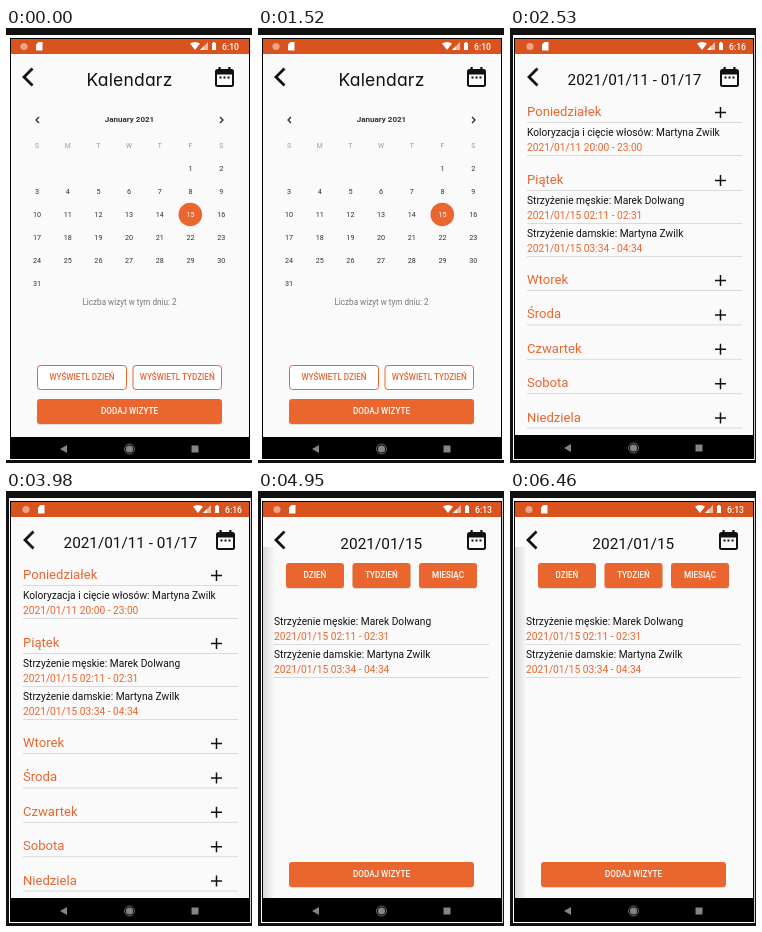
An HTML page for the animation above (7.46 s loop, 246x435 px).

```html
<!DOCTYPE html>
<html lang="pl">
<meta charset="utf-8">
<title>Kalendarz</title>
<style>
  html, body { margin: 0; width: 100%; height: 100%; overflow: hidden; background: #111 }
  svg { display: block; width: 246px; height: 435px; font-family: Roboto, sans-serif }
  .title { font-family: Inter, sans-serif; font-feature-settings: "cv11"; letter-spacing: .2px }
</style>
<svg id="stage" viewBox="0 0 246 435"></svg>
<script>
const ORANGE = '#e9662f', INK = '#111', RULE = '#dadada';
const stage = document.getElementById('stage');

const rect = (x, y, w, h, fill, extra = '') =>
  `<rect x="${x}" y="${y}" width="${w}" height="${h}" fill="${fill}" ${extra}/>`;
const path = (d, stroke, width, fill = 'none') =>
  `<path d="${d}" stroke="${stroke}" stroke-width="${width}" fill="${fill}"/>`;
const text = (x, y, size, str, fill = INK, extra = '') =>
  `<text x="${x}" y="${y}" font-size="${size}" fill="${fill}" ${extra}>${str}</text>`;
const centered = (x, y, size, str, fill, weight = 400, extra = '') =>
  text(x, y, size, str, fill, `text-anchor="middle" font-weight="${weight}" ${extra}`);
const at = (x, y, body) => `<g transform="translate(${x} ${y})">${body}</g>`;

function button(x, y, w, h, label, outlined) {
  const box = outlined
    ? rect(x + .5, y + .5, w - 1, h - 1, '#fff', `rx="3" stroke="${ORANGE}"`)
    : rect(x, y + 1, w, h, '#000', 'rx="3" opacity=".12"') + rect(x, y, w, h, ORANGE, 'rx="3"');
  return box + centered(x + w / 2, y + h / 2 + 2.9, 8.15, label, outlined ? ORANGE : '#fff', 500);
}

const calendarIcon =
  rect(1, 3, 17, 16, 'none', `rx="1.5" stroke="${INK}" stroke-width="2"`) +
  rect(1, 3, 17, 4.5, INK) + rect(3.5, 0, 2.2, 4, INK) + rect(13.3, 0, 2.2, 4, INK) +
  [4.5, 8.5, 12.5].map(x => rect(x, 9.5, 2, 2, INK)).join('');

function statusBar(left, right, time) {
  return rect(5, 11, 238, 15, '#d8531d') +
    `<circle cx="${left}" cy="18.5" r="3.6" fill="#eda387"/>` +
    path(`M${left + 12} 16.5l2.5-2.5h4v8.5h-6.5z`, 'none', 0, '#fff') +
    at(right, 14,
      path('M0 1.5Q5 -1.5 10 1.5L5 8z', 'none', 0, '#fff') +
      path('M18 0V8H10z', 'none', 0, '#f0b8a2') + path('M14 4V8H10z', 'none', 0, '#fff') +
      path('M22 1h1V0h2v1h1v7h-4z', 'none', 0, '#fff') +
      text(32, 8, 8.6, time, '#fff', 'font-weight="500"'));
}

function navBar(top) {
  const y = (top + 431) / 2 + 1;
  return rect(5, top, 238, 431 - top, '#000') +
    path(`M61 ${y - 4}v8l-7-4z`, 'none', 0, '#858585') +
    `<circle cx="123.5" cy="${y}" r="3.6" fill="#858585"/>` +
    `<circle cx="123.5" cy="${y}" r="5" fill="none" stroke="#858585" stroke-width=".8"/>` +
    rect(185.5, y - 3.5, 7, 7, '#858585');
}

function screen({ page, left, right, time, nav, back, icon, body }) {
  return rect(0, 0, 246, 435, INK) + rect(page, 7, 246 - page * 1.4, 425, '#fff') +
    rect(4, 10, 240, 421, '#000') + rect(5, 11, 238, 419, '#fafafa') +
    statusBar(left, right, time) + navBar(nav) +
    path(`M${back + 9.5} 40.5l-8.5 8.5 8.5 8.5`, INK, 2.8) + at(icon, 39, calendarIcon) + body;
}

function month() {
  const colX = c => 31 + c * 30.7;
  let out = centered(123.5, 58, 17.5, 'Kalendarz', INK, 400, 'class="title"') +
    path('M33 89l-3 3 3 3M214 89l3 3-3 3', '#222', 1.2) +
    centered(123.5, 94.3, 8, 'January 2021', '#333', 700);
  [...'SMTWTFS'].forEach((d, c) => out += centered(colX(c), 120, 6.8, d, '#999'));
  out += `<circle cx="184.3" cy="186.5" r="11.8" fill="${ORANGE}"/>`;
  for (let day = 1; day <= 31; day++) {
    const cell = day + 4;
    out += centered(colX(cell % 7), 142.5 + Math.floor(cell / 7) * 23, 7.2, day, day === 15 ? '#fff' : '#333');
  }
  return out + centered(123.5, 276.5, 8.15, 'Liczba wizyt w tym dniu: 2', '#777') +
    button(31, 337, 90, 25, 'WYŚWIETL DZIEŃ', true) +
    button(126.5, 337, 89.5, 25, 'WYŚWIETL TYDZIEŃ', true) +
    button(31, 371, 185, 25, 'DODAJ WIZYTE');
}

const rule = (x, y) => rect(x, y, 215, 1, RULE);
const visit = (x, y, name, when) =>
  text(x, y, 10.2, name) + text(x, y + 15, 10.2, when, ORANGE) + rule(x, y + 19.5);
const heading = (y, day) =>
  text(17, y, 13.1, day, ORANGE) + rule(17, y + 6) + path(`M205 ${y - 3.5}h11m-5.5 -5.5v11`, INK, 1.5);

const fridayVisits = (x, y) =>
  visit(x, y, 'Strzyżenie męskie: Marek Dolwang', '2021/01/15 02:11 - 02:31') +
  visit(x, y + 33, 'Strzyżenie damskie: Martyna Zwilk', '2021/01/15 03:34 - 04:34');

const week = () => centered(124.5, 57, 15.3, '2021/01/11 - 01/17', INK) +
  heading(88, 'Poniedziałek') +
  visit(17, 107.5, 'Koloryzacja i cięcie włosów: Martyna Zwilk', '2021/01/11 20:00 - 23:00') +
  heading(156, 'Piątek') + fridayVisits(17, 175.5) +
  ['Wtorek', 'Środa', 'Czwartek', 'Sobota', 'Niedziela']
    .map((day, i) => heading(256 + i * 34.4, day)).join('');

const edgeShadow =
  '<linearGradient id="edge"><stop stop-opacity=".14"/><stop offset="1" stop-opacity="0"/></linearGradient>' +
  rect(5, 56, 12, 351, 'url(#edge)');

const day = () => edgeShadow + centered(123.3, 57.5, 15.4, '2021/01/15', INK) +
  ['DZIEŃ', 'TYDZIEŃ', 'MIESIĄC'].map((label, i) => button(28 + i * 66.5, 72, 58, 25, label)).join('') +
  fridayVisits(16, 133.5) + button(31, 371, 185, 25, 'DODAJ WIZYTE');

const scenes = [
  { until: 2530, page: 0, left: 18, right: 184, time: '6:10', nav: 409, back: 17, icon: 209, body: month() },
  { until: 4950, page: 3, left: 20, right: 187, time: '6:16', nav: 407, back: 18, icon: 210, body: week() },
  { until: 7460, page: 3, left: 19, right: 185, time: '6:13', nav: 407, back: 17, icon: 209, body: day() }
];
stage.innerHTML = scenes.map(s => `<g>${screen(s)}</g>`).join('');

function draw() {
  const t = performance.now() % 7460;
  const current = scenes.findIndex(s => t < s.until);
  [...stage.children].forEach((g, i) => g.setAttribute('visibility', i === current ? 'visible' : 'hidden'));
  requestAnimationFrame(draw);
}
draw();
</script>
</html>
```
